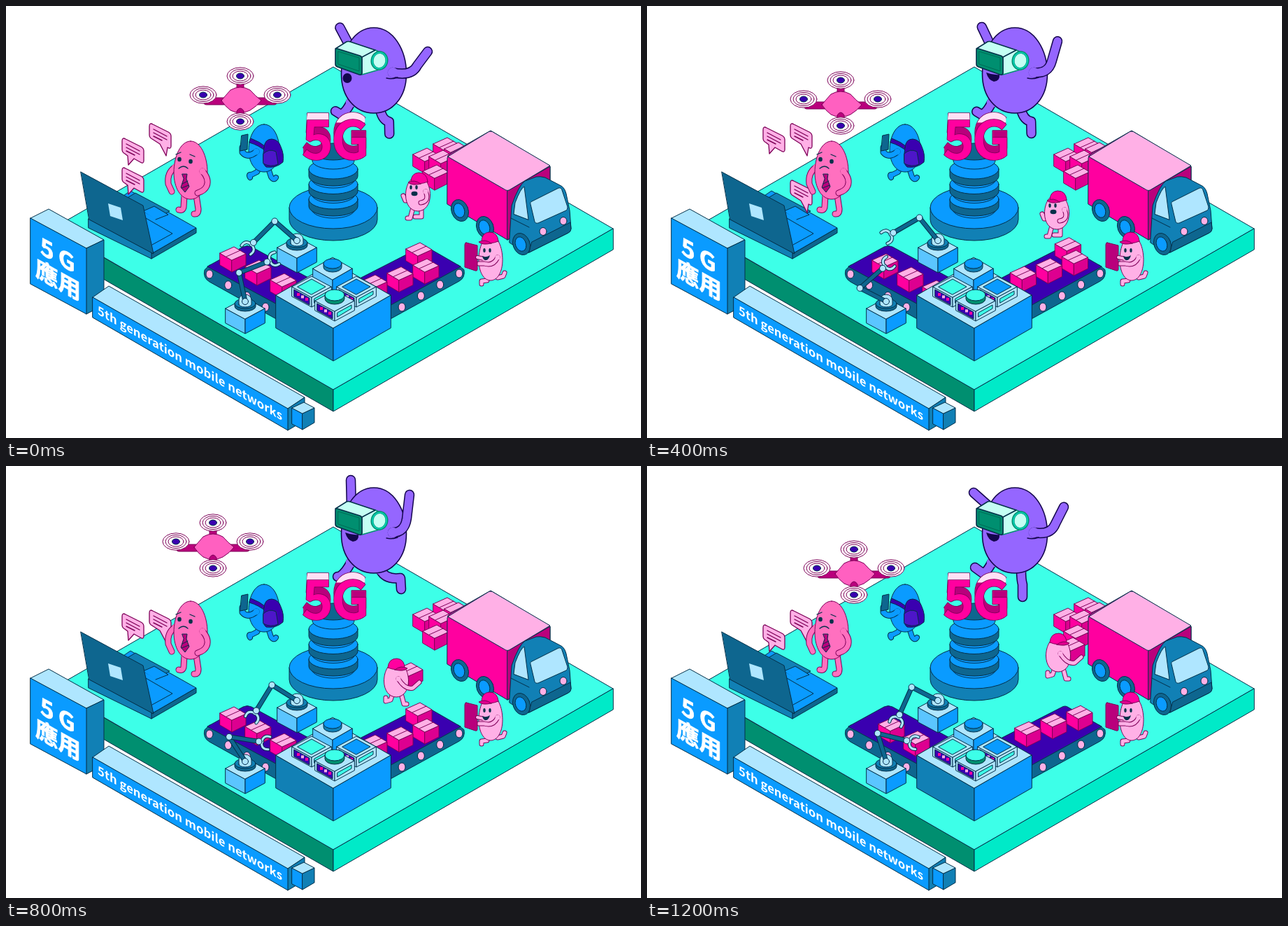
An HTML page with a canvas for the animation above (1.4 s loop, 908 by 617 pixels).

```html
<!DOCTYPE html>
<html lang="zh-Hant">
<head>
<meta charset="utf-8">
<title>5G</title>
<style>
html, body { margin: 0; width: 100%; height: 100%; overflow: hidden; background: #fff; }
canvas { display: block; }
</style>
</head>
<body>
<canvas id="stage" width="908" height="617"></canvas>
<script>
const ctx = document.getElementById('stage').getContext('2d');
const ink = '#04304a', plum = '#7d0058', night = '#14064d';
const sky = '#afe6ff', azure = '#5bc5ff', blue = '#0a9bff', mid = '#1180b5', deep = '#0e668f';
const hot = '#ff009f', rose = '#ff70bf', pale = '#ffb0e6', wine = '#b9007c';
const violet = '#9566ff', indigo = '#3a00b0';
const mint = '#3dffe8', jade = '#00eac8', pine = '#008f70', foam = '#c4fff3';
const sans = '"Noto Sans CJK TC", "Noto Sans CJK SC", "Noto Sans CJK JP", "Noto Sans", sans-serif';

// ---------- helpers ----------
function path(d, fill, line = ink, width = 1) {
  const p = new Path2D(d);
  if (fill) { ctx.fillStyle = fill; ctx.fill(p); }
  if (line) { ctx.strokeStyle = line; ctx.lineWidth = width; ctx.stroke(p); }
}
function oval(x, y, rx, ry, fill, line = ink, width = 1, tilt = 0) {
  ctx.beginPath();
  ctx.ellipse(x, y, rx, ry, tilt, 0, 7);
  if (fill) { ctx.fillStyle = fill; ctx.fill(); }
  if (line) { ctx.strokeStyle = line; ctx.lineWidth = width; ctx.stroke(); }
}
function at(x, y, paint) {
  ctx.save();
  ctx.translate(x, y);
  paint();
  ctx.restore();
}
// Outlined limb whose first end melts into the body.
function limb(x, y, d, fill, width, line, edge = 1) {
  const p = `M${x},${y}${d}`;
  path(p, null, line, width + edge * 2);
  path(p, null, fill, width);
  oval(x, y, width / 2 + edge, width / 2 + edge, fill, null);
}
function egg(x, y, w, h, fill, line, edge = 1) {
  at(x, y, () => path(`M0,${-h}C${.6 * w},${-h} ${w},${-.48 * h} ${w},${.08 * h}
    C${w},${.62 * h} ${.58 * w},${h} 0,${h}C${-.58 * w},${h} ${-w},${.62 * h} ${-w},${.08 * h}
    C${-w},${-.48 * h} ${-.6 * w},${-h} 0,${-h}Z`, fill, line, edge));
}
function block(x, y, w, d, h, left, right) {
  at(x, y, () => {
    path(`M${-w},0 0,${d}v${h}L${-w},${h}Z`, left);
    path(`M${w},0 0,${d}v${h}L${w},${h}Z`, right);
    path(`M${-w},0 0,${-d} ${w},0 0,${d}Z`, sky);
  });
}
function drum(x, y, rx, ry, h, side, top) {
  path(`M${x - rx},${y}v${h}a${rx},${ry} 0 0 0 ${2 * rx},0v${-h}Z`, side);
  oval(x, y, rx, ry, top);
}
function parcel(x, y) {
  at(x, y, () => {
    path('M0,9 17,19V36L0,26Z', hot, plum);
    path('M17,19 37,10V26L17,36Z', '#dd0090', plum);
    path('M0,9 20,0 37,10 17,19Z', pale, plum);
    path('M9,14 29,5', null, plum);
  });
}
// Text sheared onto a wall; bold adds weight to the glyphs.
function label(text, x, y, size, slope, bold = 0) {
  at(x, y, () => {
    ctx.transform(1, slope, 0, 1, 0, 0);
    ctx.font = `900 ${size}px ${sans}`;
    ctx.fillStyle = ctx.strokeStyle = '#fff';
    ctx.lineWidth = bold;
    ctx.fillText(text, 0, 0);
    if (bold) ctx.strokeText(text, 0, 0);
  });
}

// ---------- scenery ----------
function platform() {
  path('M68,317 468,87 868,318 468,548Z', mint);
  path('M68,318 468,548v31L68,349Z', pine);
  path('M868,318 468,548v31L868,348Z', jade);
}
function signs() {
  path('M118,408 133,401 148,409 130,418Z', sky);
  path('M118,408 130,415v21L118,429Z', mid);
  path('M35,303 61,290 140,334 115,346Z', sky);
  path('M115,346 140,334v93L115,440Z', mid);
  path('M35,303 115,346v94L35,397Z', blue);
  label('5', 49, 354, 33, .54, .9);
  label('G', 75, 369, 33, .54, .9);
  label('應用', 42, 385, 32.5, .56, .9);
  path('M124,416 147,400 427,559 403,575Z', sky);
  path('M403,575 427,559v33L403,606Z', mid);
  path('M124,416 403,575v31L124,445Z', blue);
  label('5th generation mobile networks', 131, 440, 16.75, .577);
  path('M409,574 424,582v23L409,597Z', blue);
  path('M424,582 441,574v21L424,605Z', mid);
  path('M409,574 426,566 441,574 424,582Z', sky);
}
function laptop() {
  path('M118,305 178,264 272,317 208,354Z', blue);
  path('M208,354 272,317v7L208,361Z', deep);
  path('M170,276 185,267 234,293 215,304 196,293Z', mid);
  path('M196,293 212,286 232,298 214,305', blue);
  path('M200,303 238,325 209,341', null);
  path('M118,304 208,352v9L118,317Z', mid);
  path('M107,237 196,285 211,354 119,305Z', deep);
  path('M146,282 164,288 167,306 149,300Z', sky, null);
}
function tower() {
  drum(468, 288, 63, 30, 17, mid, blue);
  for (let y = 276; y > 220; y -= 21.5) {
    drum(468, y + 2, 31, 13, 12, blue, blue);
    drum(468, y, 35, 14, 10, deep, blue);
  }
  drum(468, 208, 30, 12, 13, blue, deep);
  const shade = ctx.createLinearGradient(0, 166, 0, 167);
  shade.addColorStop(0, '#ffe0f5');
  shade.addColorStop(1, wine);
  ctx.font = `900 76px ${sans}`;
  ctx.lineWidth = 1.6;
  ctx.strokeStyle = plum;
  for (const [c, x] of [['5', 423], ['G', 465]]) {
    ctx.strokeText(c, x, 209);
    ctx.fillStyle = shade;
    for (let y = 209; y < 219; y++) ctx.fillText(c, x, y);
    ctx.strokeText(c, x, 219);
    ctx.fillStyle = hot;
    ctx.fillText(c, x, 219);
  }
}
function wheel(x, y) {
  oval(x, y, 12, 16, deep, ink, 1, -.35);
  oval(x - 1, y, 7.5, 10.5, blue, ink, 1, -.35);
}
function truck() {
  path('M631,217Q631,213 635,211L693,178 778,229V300L717,334 631,283Z', hot);
  path('M717,264 778,229V300L717,334Z', wine);
  path('M632,215 688,181Q693,177 698,181L778,228 721,262Q717,265 713,262Z', pale);
  wheel(649, 292);
  wheel(685, 316);
  path(`M720,332L723,285Q733,256 742,250L758,244Q764,243 771,245L794,257Q799,260 801,268
    L806,292 808,318Q808,322 804,324L748,352Q742,354 738,350L720,338Z`, mid);
  path('M752,337 807,309 808,318Q808,322 804,324L748,352Z', deep);
  path('M750,283Q749,280 752,279L790,260Q794,259 795,263L803,287Q803,291 801,292L761,310Q757,311 756,308Z', sky);
  path('M726,297 728,281Q736,260 741,258L747,305Z', sky);
  path('M722,303 748,316', null);
  oval(768, 322, 5, 5.5, pale);
  oval(797, 307, 5, 5.5, pale);
  wheel(737, 340);
}
function pile() {
  for (const [x, y] of [[611, 188], [582, 203], [627, 195], [605, 206], [596, 227]]) parcel(x, y);
}

// ---------- production line ----------
function belts(i) {
  path('M284,377Q281,388 291,394L390,449V420L292,370Z', deep);
  path('M288,372 339,344Q345,341 351,344L436,390 390,427Z', indigo);
  path('M655,377Q657,388 648,393L546,449V422L646,370Z', deep);
  path('M650,372 603,345Q598,341 592,345L500,392 546,429Z', indigo);
  for (let n = 0; n < 4; n++) {
    oval(291 + 26.7 * n, 383 + 15.7 * n, 5, 6, pale);
    oval(648 - 27.3 * n, 382 + 16 * n, 5, 6, pale);
  }
  const shift = i % 3 * 25 % 34;
  if (shift < 20) parcel(572 + .72 * shift, 338 - .45 * shift);
  for (let n = 0; n < 3; n++) {
    parcel(306 + 36 * n + shift, 344 + 19 * n + .62 * shift);
    parcel(582 - 37 * n + .72 * shift, 361 + 11.5 * n - .75 * shift);
  }
}
function panel(x, y) {
  at(x, y, () => {
    path('M-25,4 -3,16V26L-25,14Z', indigo);
    path('M4,17 24,6V11L4,23Z', mint);
    for (let n = 0; n < 3; n++) {
      ctx.fillStyle = n % 2 ? pale : hot;
      ctx.fillRect(-21 + n * 6, 9 + n * 3.4, 4, 4);
    }
  });
}
function screen(x, y, fill) {
  block(x, y, 28, 15, 14, sky, sky);
  panel(x, y);
  at(x, y, () => path('M-20,0 0,-11 20,0 0,11Z', fill));
}
function machine() {
  block(468, 413, 82, 47, 47, mid, blue);
  block(467, 375, 28, 16, 18, azure, blue);
  drum(467, 368, 13, 7, 5, mid, blue);
  screen(437, 401, mint);
  screen(501, 401, blue);
  block(470, 421, 28, 15, 14, sky, sky);
  panel(470, 421);
  drum(470, 413, 14, 8, 5, pine, mint);
}
// Two links set by their angles in degrees.
function robot(x, y, upper, fore) {
  block(x, y + 10, 28, 15, 21, azure, blue);
  drum(x, y + 3, 15, 7, 4, deep, mid);
  path(`M${x - 9},${y + 4}v-6a9,8 0 0 1 18,0v6a9,4 0 0 1 -18,0Z`, sky);
  const turn = Math.PI / 180;
  const ex = x + 42 * Math.cos(upper * turn), ey = y + 42 * Math.sin(upper * turn);
  const hx = ex + 43 * Math.cos(fore * turn), hy = ey + 43 * Math.sin(fore * turn);
  at(hx, hy, () => {
    ctx.rotate(fore * turn);
    const hooks = 'M0,0H5M15,-9Q5,-11 4,0Q5,11 15,9';
    path(hooks, null, ink, 5);
    path(hooks, null, sky, 3);
  });
  for (const d of [`M${x},${y}L${ex},${ey}`, `M${ex},${ey}L${hx},${hy}`]) {
    path(d, null, ink, 7);
    path(d, null, deep, 5);
  }
  for (const [px, py] of [[x, y], [ex, ey], [hx, hy]]) oval(px, py, 4.5, 4.5, sky);
}
function robots(i) {
  const swing = [0, -14, 10, -9][i];
  robot(416, 335, 221 + swing, 135 + 1.5 * swing);
  robot(342, 422, [258, 253, 207, 237][i], [-21, 14, -41, 9][i]);
}

// ---------- drone and chat ----------
function drone(i) {
  const [dx, dy] = [[0, 0], [-39, 19], [-58, 6], [-39, -19]][i];
  at(335 + dx, 135 + dy, () => {
    for (const d of ['M-48,1H-24', 'M48,1H24', 'M0,-26V-14']) {
      path(d, null, plum, 11);
      path(d, null, wine, 9);
    }
    path('M-27,0Q-22,-6 -14,-15Q0,-23 14,-15Q22,-6 30,0Q24,8 14,14Q0,21 -14,14Q-22,8 -27,0Z', '#ff60c0', plum);
    path('M-5,25V15Q0,7 5,15V25Z', wine, plum);
    for (const [x, y] of [[0, -35], [-53, -8], [53, -8], [0, 30]]) {
      for (let r = 19; r > 10; r -= 4) oval(x, y, r, r * .64, '#fff', plum);
      oval(x, y, 5.5, 4, indigo);
    }
  });
}
function bubble(x, y, tailRight) {
  const tail = tailRight ? 'L26,34 24,46 15,29' : 'L17,29 9,38 8,25';
  at(x, y, () => {
    path(`M0,4Q0,-2 5,1L27,12Q31,14 31,18V32Q31,37 26,34${tail}L4,22Q0,20 0,16Z`, pale, plum, 1.3);
    path('M6,8 25,18M6,13 25,23M6,18 18,24', null, plum, 1.4);
  });
}
function chat(i) {
  const low = i % 2;
  bubble(166, 189 - 8 * i + 46 * low);
  bubble(205, 168 + 38 * low, true);
  if (!low) bubble(166 + 19.5 * i, 231 + 9 * i, i);
}

// ---------- people ----------
function clerk() {
  const skin = [rose, 7, plum];
  limb(255, 270, 'L254,287Q253,293 247,291', ...skin);
  limb(272, 270, 'L275,290Q275,298 269,297', ...skin);
  limb(242, 230, 'Q230,238 232,254L237,265', ...skin);
  egg(264, 234.5, 24, 41.5, rose, plum);
  limb(281, 236, 'Q291,247 287,257Q284,264 274,267', ...skin);
  oval(248, 219, 2.8, 3.3, ink, null);
  oval(264, 222, 2.8, 3.3, ink, null);
  path('M243,212 250,209M263,212 270,215M247,232Q254,226 260,232', null, ink, 1.3);
  path('M252,240H259L258,247 262,258 256,266 250,259 254,247Z', wine, ink);
  path('M252,254 260,250M251,260 261,256', null, ink);
}
function hiker() {
  limb(363, 230, 'L359,237 351,241Q346,240 349,245', blue, 6, ink);
  limb(375, 232, 'L379,244Q383,250 386,245', blue, 6, ink);
  egg(369, 203, 22, 34, blue, ink);
  limb(358, 208, 'Q346,218 338,209V202', blue, 7, ink);
  path('M337,185 346,183 345,205 335,207Z', deep);
  path('M350,189Q362,193 374,203L372,208Q362,199 348,195Z', indigo);
  path('M369,202Q370,190 380,190Q390,191 393,201Q398,212 396,223Q386,232 372,230Q365,226 369,202Z', indigo);
  path('M368,211Q376,203 386,208L389,226Q378,231 368,225Z', '#4d16c9');
}
function cap(x, y, dir) {
  at(x, y, () => {
    ctx.scale(dir, 1);
    path('M-12,5Q-11,-8 1,-8Q12,-7 12,6Q0,10 -12,5Z', hot, plum);
    path('M-2,8Q7,1 16,6Q11,11 -2,8Z', '#e0008f', plum);
  });
}
// Walks out empty-handed, turns, and returns with a parcel.
function worker(step) {
  const spots = [[589, 268], [585, 281], [586, 294], [568, 324], [558, 305], [589, 292], [588, 269]];
  const carry = step > 3, skin = [pale, 5, plum];
  at(...spots[step], () => {
    if (carry) parcel(1, -24);
    if (step < 3) ctx.scale(-1, 1);
    limb(-5, 20, step < 3 ? 'V33H4' : 'L-8,29 -15,31V26', ...skin);
    limb(7, 20, 'L11,35H15', ...skin);
    if (!carry) limb(12, 9, 'L18,10 21,3', ...skin);
    egg(0, 0, 17.5, 25, pale, plum);
    cap(step < 3 ? -2 : 0, -22, 1);
    if (carry) {
      limb(3, -1, 'Q13,15 24,12L33,4', ...skin);
    } else {
      for (const x of [2, 10]) oval(x, -9, 1.7, 3, ink, null);
      oval(5, 0, 4.5, 3.2, ink, null);
      limb(-11, -3, 'Q-17,11 -4,13', ...skin);
    }
  });
}
function checker() {
  const skin = [pale, 5, plum];
  limb(689, 384, 'L688,392 680,393V397', ...skin);
  limb(699, 382, 'L703,388 711,386 713,381', ...skin);
  egg(693, 360, 17, 32, pale, plum);
  limb(703, 359, 'Q697,372 684,368H676', ...skin);
  path('M658,338 674,342V376Q674,379 671,378L656,373V341Q656,338 658,338Z', wine, plum);
  limb(684, 361, 'L674,359', pale, 4, plum);
  cap(692, 331, -1);
  oval(684, 349, 1.7, 3, ink, null);
  oval(692, 349, 1.7, 3, ink, null);
  path('M681,357Q686,360 692,356Q690,364 685,363Q682,362 681,357Z', ink, null);
}
function jumper(i) {
  const lift = [.4, 0, .45, 1][i], reach = (i / 3) ** 1.2;
  const skin = [violet, 11.5, night, 1.5];
  limb(493, 138, `Q486,152 ${480 - 3 * lift},${153 + 5 * lift}L${469 + 5 * lift},${145 + 13 * lift}`, ...skin);
  limb(535, 148, `Q${535 + 8 * lift},163 ${537 + 27 * lift},${169 - 9 * lift}L${537 + 28 * lift},${187 - 11 * lift}`, ...skin);
  limb(494, 62, `L${467 + 26 * lift},${38 - 18 * lift}`, ...skin);
  egg(526, 92, 46.5, 61, violet, night, 1.6);
  limb(553, 95, `Q${580 - 10 * reach},${101 - 6 * reach} ${588 - 15 * reach},${85 - 10 * reach}L${603 - 26 * reach},${65 - 24 * reach}`, ...skin);
  path('M544,103Q551,105 560,102', null, night, 1.4);
  if (i) path('M485,95Q495,99 504,98Q505,107 496,108Q488,106 485,95Z', night, null);
  else oval(488, 103, 6.5, 7, night, null);
  path('M509,72 528,63 538,67 537,90 509,98Z', foam, pine, 1.6);
  path('M471,61 487,51Q489,50 492,51L528,63 509,73Z', foam, ink, 1.5);
  path('M474,61 506,71Q509,72 509,75V95Q509,99 505,98L474,87Q471,86 471,83V63Q471,60 474,61Z', pine, ink, 1.6);
  path('M475,65 505,74V93L475,83Z', null, '#006b55');
  oval(534, 78, 10.5, 12, foam, pine, 4, .15);
  oval(534, 78, 10, 11.5, null, '#00cdb0', 2, .15);
}

// ---------- timeline ----------
const start = performance.now();
function draw() {
  const step = Math.floor((performance.now() - start) % 1400 / 200);
  const i = Math.min(step, 7 - step); // there and back again
  ctx.lineCap = ctx.lineJoin = 'round';
  ctx.clearRect(0, 0, 908, 617);
  platform();
  signs();
  laptop();
  chat(i);
  clerk();
  hiker();
  drone(i);
  jumper(i);
  tower();
  pile();
  worker(step);
  truck();
  belts(i);
  machine();
  robots(i);
  checker();
  requestAnimationFrame(draw);
}
draw();
</script>
</body>
</html>
```
